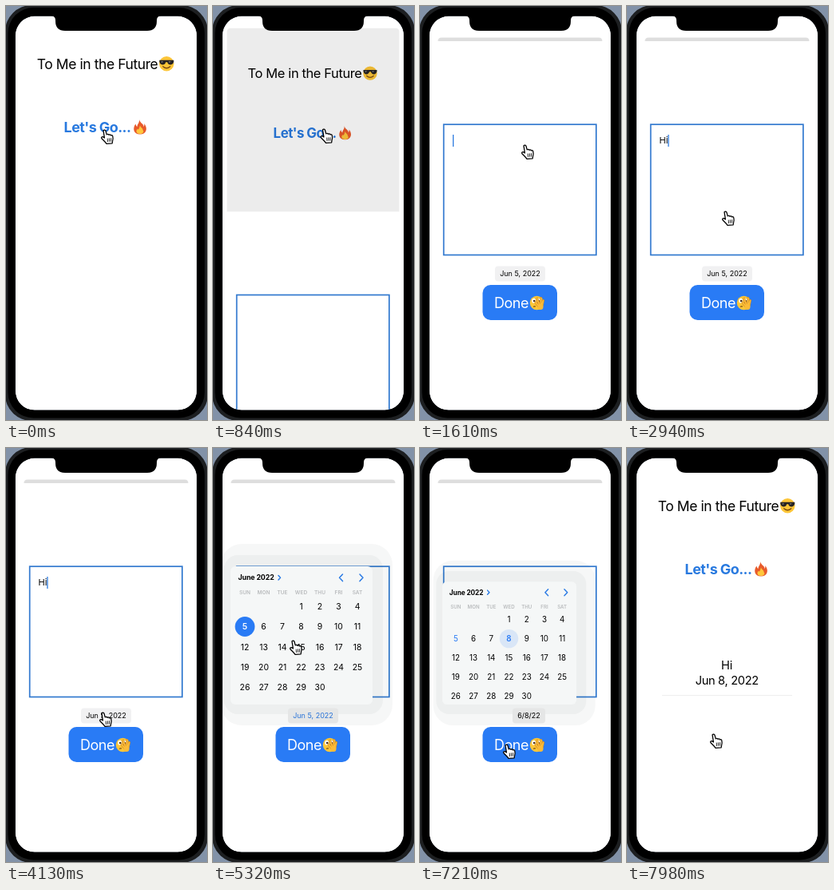
Animation, 252 px wide and 518 px high, one loop 8 s. Source, as an HTML page:

```html
<!DOCTYPE html>
<html lang="en">
<head>
<meta charset="utf-8">
<title>To Me in the Future</title>
<style>
  html, body { margin: 0; width: 100%; height: 100%; overflow: hidden; background: #fff; }
  svg { display: block; width: 100vw; height: 100vh; }
  text { font-family: Inter, Roboto, sans-serif; }
  .mid { text-anchor: middle; }
  .title { font-size: 17.5px; letter-spacing: -.42px; }
  .go { font-size: 18px; font-weight: 700; letter-spacing: -.6px; fill: #2879df; }
  .row { font-size: 14.7px; letter-spacing: -.35px; }
  .done { font-size: 18px; letter-spacing: -.5px; fill: #fff; }
  .note { font-size: 11px; }
  .date { font-size: 9px; }
  .month { font-size: 8.8px; font-weight: 700; letter-spacing: -.1px; }
  .weekday { font-size: 6.5px; font-weight: 600; fill: #b9bbbd; }
  .day { font-size: 10.4px; }
  .chevron { fill: none; stroke: #2a7ae4; stroke-width: 1.5; stroke-linecap: round; stroke-linejoin: round; }
</style>
</head>
<body>
<svg viewBox="0 0 252 518" preserveAspectRatio="none">
  <rect width="252" height="518" fill="#fff"/>

  <g id="home">
    <text class="title mid" x="114.5" y="78.5">To Me in the Future</text>
    <g transform="translate(201.3 72.3)">
      <circle r="9.2" fill="#fdc638"/>
      <path d="M-9-4.5H9V-2.5C8 2.5 2 2.5 1-2H-1C-2 2.5-8 2.5-9-2.5Z" fill="#272322"/>
      <path d="M-7-3l3 0-2 2zM2.5-3l3 0-2 2z" fill="#777"/>
      <path d="M-4.5 3.5Q0 7.5 4.500 3.5" fill="none" stroke="#7a4a12" stroke-width="1.3" stroke-linecap="round"/>
    </g>
    <text class="go mid" x="114.5" y="158">Let's Go...</text>
    <g transform="translate(168 151.5)">
      <path d="M-1-9.5C0-5 5-4 4.5-.5 5.500-1.5 5.500-3 5.200-4.5 10 1 8.500 9 0 9-8.500 9-9.500 1-5.500-4-5.200-2-4.500-1-3.500-.5-3.500-4-.5-5-1-9.500Z" fill="#e85a2a"/>
      <path d="M0-2C1 1 3.500 1 3.500 3.500 6 7 2.500 8.500 0 8.500-4.500 8.500-5.500 5-3.500 2.500-2 4-1 2 0-2Z" fill="#ffc73c"/>
    </g>
    <g id="entry">
      <text class="row mid" x="125" y="277">Hi</text>
      <text class="row mid" x="125.3" y="295.5">Jun 8, 2022</text>
      <path d="M44 309.5H207" stroke="#eee"/>
    </g>
    <path id="dim" d="M16 12.500H235Q240 12.500 240 17.500V518H11V17.500Q11 12.500 16 12.500Z"/>
  </g>

  <g id="sheet">
    <rect y="44" width="252" height="490" fill="#fff"/>
    <rect x="29.7" y="148.2" width="191.2" height="163.3" fill="none" stroke="#3279cf" stroke-width="1.7"/>
    <g id="note">
      <text class="note" id="typed" x="40.5" y="172"></text>
      <rect id="caret" y="161" width="1.3" height="15" fill="#2c7be0"/>
    </g>
    <g id="calendar"></g>
    <rect id="chip" y="325.5" height="19" rx="4"/>
    <text class="date mid" id="date" y="338.3"></text>
    <rect x="78.5" y="349" width="93.5" height="44" rx="10" fill="#297bf5"/>
    <text class="done mid" x="114.5" y="377.8">Done</text>
    <g transform="translate(146.5 371.5)">
      <circle r="8.7" fill="#fdc638"/>
      <g fill="#fff">
        <ellipse cx="-3.8" cy="-2.8" rx="2.4" ry="2.9"/>
        <ellipse cx="2.6" cy="-2.4" rx="2.6" ry="3"/>
      </g>
      <path d="M-3.300-2.500h.1M2.600-2h.1" stroke="#4b2d17" stroke-width="2.600" stroke-linecap="round"/>
      <path d="M-4.500 4.800Q-3 4-1.500 4.600" fill="none" stroke="#7a4a12" stroke-width="1.100"/>
      <g fill="none" stroke-linecap="round">
        <path d="M3 5L-1.500-.5M4 4L.2-5.500M5 4L5.300-6M6 5L8-3" stroke="#c07c1c" stroke-width="2.900"/>
        <path d="M3 5L-1.500-.5M4 4L.2-5.500M5 4L5.300-6M6 5L8-3" stroke="#fbbb38" stroke-width="2"/>
      </g>
      <circle cx="4.500" cy="5" r="3.500" fill="#fbbb38"/>
    </g>
  </g>

  <g id="bezel"></g>

  <g id="cursor" stroke="#000" stroke-linejoin="round">
    <path fill="#fff" stroke-width="1.2" d="M-4.600-7.500c.8-1.200 2.400-.8 2.800.6l1.100 4c.9-.9 2.200-.6 2.500.4.900-.7 2-.4 2.300.6 1-.6 2-.1 2.200.9.500 2.200.5 4-.3 6l-.3 2.200-6.600.6c-1.500-2.300-3.500-3.900-5.600-6.200-1-1.200.5-2.600 1.800-1.700l1.400 1z"/>
    <path stroke-width=".8" d="M.2 1.500l.3 4M2.200 1.300l.2 4M4.200 1.200l0 4"/>
  </g>
</svg>

<script>
const $ = id => document.getElementById(id);
const LOOP = 8000, TICK = 70;
const BLUE = '#297bf5';
const OPEN = 4410, PICK = 5530, CLOSE = 7140, DISMISS = 7280;
const clamp = v => Math.min(1, Math.max(0, v));
const mix = (a, b, p) => a + (b - a) * p;
const smooth = p => p * p * (3 - 2 * p);
const set = (el, attrs) => Object.entries(attrs).forEach(([k, v]) => el.setAttribute(k, v));
const show = (el, visible) => set(el, { display: visible ? 'inline' : 'none' });

function add(parent, tag, attrs, text = '') {
  const el = document.createElementNS('http://www.w3.org/2000/svg', tag);
  set(el, attrs);
  el.textContent = text;
  return parent.appendChild(el);
}

// Phone body: each layer leaves the screen opening free.
const roundRect = (x, y, w, h, r) =>
  `M${x + r} ${y}h${w - 2 * r}a${r} ${r} 0 0 1 ${r} ${r}v${h - 2 * r}a${r} ${r} 0 0 1 ${-r} ${r}` +
  `h${2 * r - w}a${r} ${r} 0 0 1 ${-r} ${-r}v${2 * r - h}a${r} ${r} 0 0 1 ${r} ${-r}z`;
const opening = roundRect(11.7, 12.6, 227.6, 493.2, 24);
[
  ['M0 0H252V518H0Z', '#8292a8'],
  [roundRect(-1, -1, 254, 520, 33), '#1d1f21'],
  [roundRect(2.5, 2, 246.5, 513.5, 32), '#000'],
].forEach(([outer, fill]) => add($('bezel'), 'path', { d: outer + opening, fill, 'fill-rule': 'evenodd' }));
add($('bezel'), 'path', { d: 'M57 12H194Q189 13 189 18V19Q189 31 177 31H74Q62 31 62 19V18Q62 13 57 12Z' });

// Calendar popover
const calendar = $('calendar');
const layers = [
  { x: 10, y: 120, w: 215, bottom: 347, rx: 26, fill: 'rgba(20,40,40,.035)' },
  { x: 14, y: 134, w: 199, bottom: 333, rx: 17, fill: 'rgba(20,30,30,.035)' },
  { x: 22, y: 148, w: 178, bottom: 321, rx: 6, fill: '#f5f7f7' },
].map(l => ({ ...l, el: add(calendar, 'rect', { x: l.x, y: l.y, width: l.w, rx: l.rx, fill: l.fill }) }));
const columnX = c => 40 + 23.5 * c;

add(calendar, 'text', { class: 'month', x: 31.5, y: 165.4 }, 'June 2022');
add(calendar, 'path', { class: 'chevron', d: 'M82 159.5l2.5 2.7-2.5 2.7M162.5 158l-4 4.3 4 4.3M184 158l4 4.3-4 4.3' });
['SUN', 'MON', 'TUE', 'WED', 'THU', 'FRI', 'SAT'].forEach((name, c) =>
  add(calendar, 'text', { class: 'weekday mid', x: columnX(c), y: 183.3 }, name));
const marker = add(calendar, 'circle', { r: 12.4 });
const days = Array.from({ length: 30 }, (_, i) => {
  const slot = i + 3, x = columnX(slot % 7), y = 198.3 + 25.2 * Math.floor(slot / 7);
  return { x, y, el: add(calendar, 'text', { class: 'day mid', x, y: y + 3.8 }, i + 1) };
});

// Pointer path: time, x, y
const pointer = [
  [0, 127, 164], [350, 127, 164], [490, 150, 143], [700, 150, 143], [980, 135, 183],
  [1610, 135, 183], [1680, 133, 210], [2310, 133, 210], [2660, 127, 266], [3360, 127, 266],
  [3780, 128, 394], [4130, 125, 340], [4620, 125, 340], [5110, 104, 250], [5320, 104, 250],
  [5530, 115, 235], [5740, 115, 235], [5810, 194, 302], [6370, 194, 302], [6860, 112, 380],
  [7910, 112, 380], [7980, 112, 367], [8000, 112, 367],
];
function pointerAt(t) {
  const i = Math.max(1, pointer.findIndex(k => k[0] >= t));
  const [t0, x0, y0] = pointer[i - 1], [t1, x1, y1] = pointer[i];
  const p = smooth(clamp((t - t0) / (t1 - t0)));
  return [mix(x0, x1, p), mix(y0, y1, p)];
}

// Critically damped spring from 0 to 1
function spring(ms, rate) {
  const u = Math.max(0, ms) * rate / 1000;
  return u > 7.6 ? 1 : 1 - (1 + u) * Math.exp(-u);
}

function drawHome(t, open) {
  const scale = mix(1, .9, open);
  set($('home'), { transform: `translate(${125.3 * (1 - scale)} ${mix(12, 39, open) - 12 * scale}) scale(${scale})` });
  set($('dim'), { opacity: .13 * open });
  show($('entry'), t >= CLOSE);
}

function drawNote(t) {
  const typed = t < 2590 ? 0 : t < 2940 ? 1 : 2;
  $('typed').textContent = 'Hi'.slice(0, typed);
  set($('caret'), { x: [41, 48.5, 51.3][typed] });
  show($('note'), t >= 1610 && (t < OPEN || t >= DISMISS));
}

function drawCalendar(t, picked) {
  const shown = smooth(clamp((t - OPEN) / 350));
  const closing = clamp((t - CLOSE) / 210);
  const s = mix(.8, 1, shown) - .165 * closing;
  const opacity = shown * (closing < .4 ? 1 : 1 - (closing - .4) / .6);
  set(calendar, { opacity, transform: `translate(${129 * (1 - s)} ${498 * (1 - s)}) scale(${s})` });
  // The lower edges stay put while the rest scales.
  layers.forEach(l => set(l.el, { height: (l.bottom - 498 * (1 - s)) / s - l.y }));

  const [today, other] = [days[4], days[7]];
  const chosen = picked ? other : today;
  set(marker, { cx: chosen.x, cy: chosen.y, fill: picked ? '#d9e6f7' : BLUE });
  set(today.el, { fill: picked ? BLUE : '#fff', 'font-weight': picked ? 400 : 600 });
  set(other.el, { fill: picked ? BLUE : '#000', 'font-weight': picked ? 600 : 400 });
}

function drawDate(t, picked) {
  const active = t >= OPEN && t < CLOSE;
  const left = picked ? 116 : 94;
  $('date').textContent = picked ? '6/8/22' : 'Jun 5, 2022';
  set($('date'), { x: (left + 157) / 2, fill: active ? '#2a74d8' : '#000' });
  set($('chip'), { x: left, width: 157 - left, fill: active || picked ? '#e5e6e6' : '#f1f1f2' });
}

function frame(now) {
  const t = Math.floor(now % LOOP / TICK) * TICK;
  const open = spring(t - 680, 11.84) - spring(t - DISMISS, 14);
  const picked = t >= PICK;
  drawHome(t, open);
  set($('sheet'), { transform: `translate(0 ${490 * (1 - open)})` });
  drawNote(t);
  drawCalendar(t, picked);
  drawDate(t, picked);
  set($('cursor'), { transform: `translate(${pointerAt(t)}) scale(1.08)` });
}

const start = performance.now();
(function tick() {
  frame(performance.now() - start);
  requestAnimationFrame(tick);
})();
</script>
</body>
</html>
```
